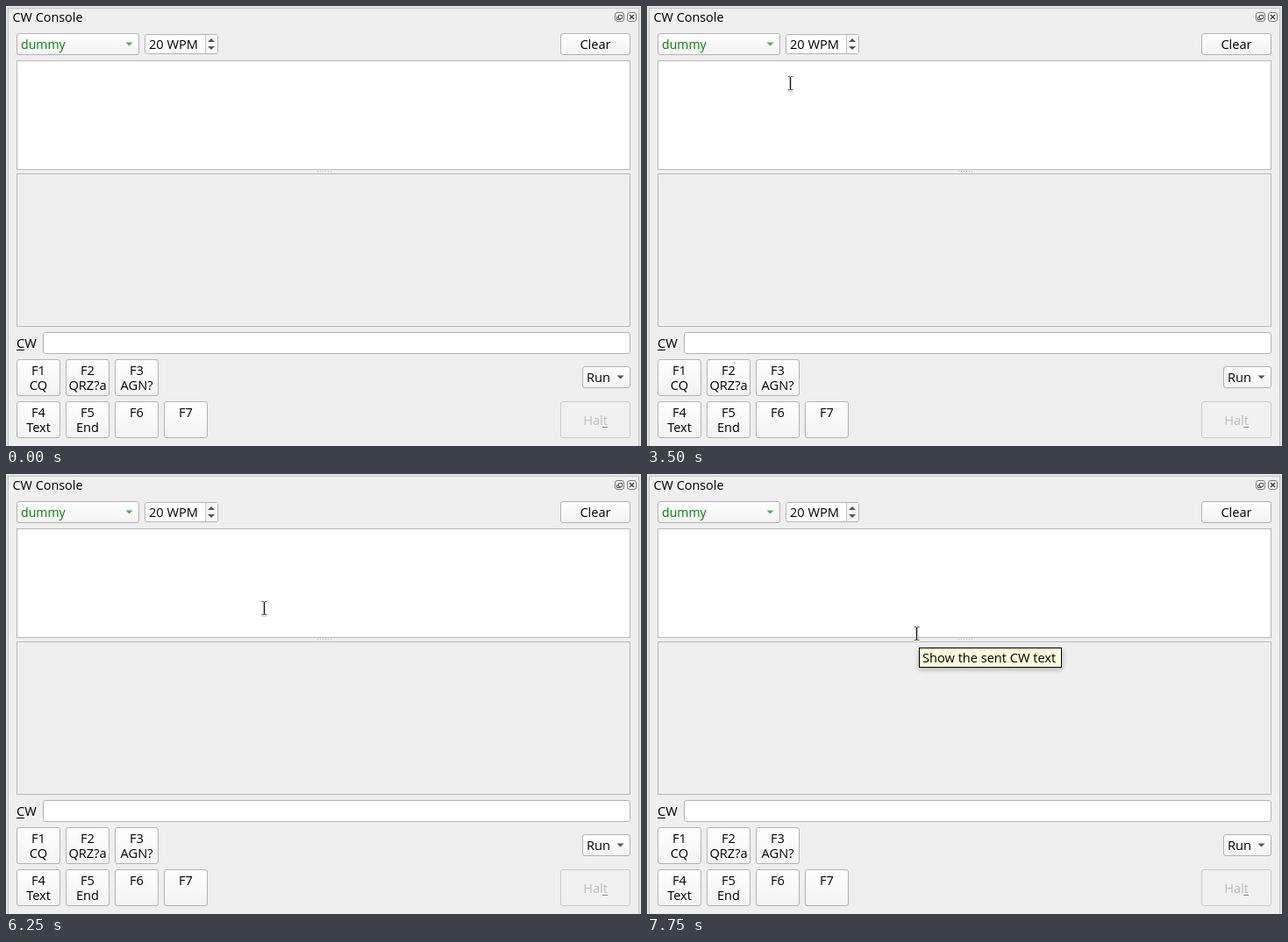
An HTML page for the animation above (8 s loop, 724 px wide and 502 px high).

```html
<!DOCTYPE html>
<html lang="en">
<head>
<meta charset="utf-8">
<title>CW Console</title>
<style>
html, body { margin: 0; width: 100%; height: 100%; overflow: hidden; background: #efefef; }
svg { display: block; width: 724px; height: 502px; }
text { font: 14.6px "Open Sans", "Noto Sans", sans-serif; fill: #000; white-space: pre; }
.mid { text-anchor: middle; }
</style>
</head>
<body>
<svg viewBox="0 0 724 502" xmlns="http://www.w3.org/2000/svg">
  <defs>
    <linearGradient id="face" x1="0" y1="0" x2="0" y2="1">
      <stop offset="0" stop-color="#fff"/>
      <stop offset="1" stop-color="#f3f3f3"/>
    </linearGradient>
    <filter id="soft" x="-10%" y="-60%" width="120%" height="220%">
      <feGaussianBlur stdDeviation="3"/>
    </filter>
  </defs>
  <rect width="724" height="502" fill="#e4e4e4"/>
  <rect x="2.5" y="2.5" width="719" height="520" fill="#efefef" stroke="#c3c3c3"/>
  <g id="ui"></g>
  <g id="tip">
    <rect x="0" y="2" width="163" height="23" fill="#000" opacity=".28" filter="url(#soft)"/>
    <rect id="paper" x=".5" y=".5" width="162" height="22" stroke="#000"/>
    <text x="4" y="17">Show the sent CW text</text>
  </g>
  <g id="beam" fill="none">
    <path d="M-3 -7.5H3.5M-3 7.5H3.5M.5 -7V8" stroke="#fff" stroke-width="3"/>
    <path d="M-2.5 9.5H3.5" stroke="#ccc"/>
    <path d="M-2.5 -7.5H0M1 -7.5H3.5M-2.5 7.5H0M1 7.5H3.5" stroke="#555"/>
    <path d="M.5 -7V7.5" stroke="#111" stroke-width="1.4"/>
  </g>
  <g id="arrow">
    <path d="M1.5 2V17L5 14L7.5 19.5L10 18.5L7.5 13H12Z" fill="#000" opacity=".18"/>
    <path d="M.5 .5V15.5L4 12.4L6.4 17.8L8.9 16.7L6.5 11.5H11.3Z" fill="#222" stroke="#fff"/>
  </g>
</svg>
<script>
const $ = id => document.getElementById(id);
const ui = $('ui');

function add(tag, attrs, label) {
  const el = document.createElementNS('http://www.w3.org/2000/svg', tag);
  for (const k in attrs) el.setAttribute(k, attrs[k]);
  if (label) el.textContent = label;
  ui.appendChild(el);
}
// Crisp 1px bordered box covering x..x2, y..y2
function box(x, y, x2, y2, fill, r = 2.5, stroke = '#b3b3b3') {
  add('rect', { x: x + .5, y: y + .5, width: x2 - x - 1, height: y2 - y - 1, rx: r, fill, stroke });
}
function label(str, x, y, mid, style = '') {
  add('text', { x, y, class: mid ? 'mid' : '', style }, str);
}
function tri(x, y, dir, fill) {
  add('path', { d: `M${x - 4} ${y - 2 * dir}h8l-4 ${4 * dir}z`, fill });
}
function line(x, y, w, fill) {
  add('rect', { x, y, width: w, height: 1, fill });
}
const FACE = 'url(#face)';

label('CW Console', 7.5, 18, false, 'font-size:14.4px');
box(694, 7, 705, 18, '#f4f4f4', 2.5, '#777');
box(708, 7, 719, 18, '#f4f4f4', 2.5, '#777');
add('path', { d: 'M698.5 10.5h4v4h-4zM698 12.5h-1.5v3h4v-1', fill: 'none', stroke: '#555' });
add('path', { d: 'M711 10l5 5m0 -5l-5 5', stroke: '#444', 'stroke-width': 1.5 });

box(12, 31, 152, 56, FACE);
label('dummy', 17, 49, false, 'fill:#008000;font-size:14.1px');
tri(140.5, 43.5, 1, '#4cae4c');
box(158, 32, 242, 55, '#fff');
add('path', { d: 'M228 33h13v21h-13z', fill: '#f6f6f6' });
add('path', { d: 'M227.5 33v21', stroke: '#c4c4c4' });
label('20 WPM', 163, 49);
tri(234, 39, -1, '#555');
tri(234, 48, 1, '#555');
box(632, 31, 712, 56, FACE);
label('Clear', 672, 49, true);

box(12, 62, 712, 187, '#fff', 0, '#b9b9b9');
box(12, 191, 712, 366, '#efefef', 0, '#b9b9b9');
for (let i = 0; i < 6; i++) line(355 + i * 3, 188, 1, '#b5b5b5');

label('CW', 12, 390);
line(12, 392, 9, '#000');
box(42, 372, 712, 397, '#fff');

[['F1', 'CQ'], ['F2', 'QRZ?a'], ['F3', 'AGN?'],
 ['F4', 'Text'], ['F5', 'End'], ['F6', ''], ['F7', '']].forEach(([key, name], i) => {
  const row = i < 3 ? 0 : 1;
  const x = 12 + 56 * (i - 3 * row), y = 403 + 48 * row;
  box(x, y, x + 50, y + 42, FACE);
  label(key, x + 25, y + 18, true);
  if (name) label(name, x + 25, y + 35, true);
});

box(657, 411, 712, 436, FACE);
label('Run', 662, 429);
tri(700.5, 423.5, 1, '#555');
box(632, 451, 712, 493, '#f1f1f1', 2.5, '#cbcbcb');
label('Halt', 672, 478, true, 'fill:#bebebe');
line(680, 480, 6, '#8a8a8a');

// time, pointer kind, x, y, tooltip index
const steps = [
  [0],
  [500, 'arrow', 20, 12],
  [630, 'arrow', 52, 27],
  [750, 'arrow', 91, 47],
  [880, 'beam', 124, 66],
  [1000, 'beam', 147, 77],
  [1130, 'beam', 155, 81],
  [3500, 'beam', 163, 88],
  [3630, 'beam', 167, 94],
  [4380, 'beam', 167, 94, 1],
  [5880, 'beam', 178, 102, 1],
  [6000, 'arrow', 214, 119, 1],
  [6130, 'beam', 264, 140],
  [6250, 'beam', 294, 153],
  [6380, 'beam', 301, 158],
  [6500, 'beam', 302, 165],
  [6630, 'beam', 303, 170, 2],
  [6750, 'arrow', 306, 176, 2],
  [6880, 'arrow', 308, 181, 2],
  [7000, 'arrow', 308, 181],
  [7630, 'beam', 307, 182],
  [7750, 'beam', 307, 182, 3]
];
const tips = [null, [170, 110, '#ffffdc'], [304, 173, '#ffffd8'], [310, 198, '#fffadc']];
const LOOP = 8000;

function place(id, on, x, y) {
  const el = $(id);
  el.style.display = on ? '' : 'none';
  if (on) el.setAttribute('transform', `translate(${x} ${y})`);
}
function draw(now) {
  const t = now % LOOP;
  const [, kind, x, y, tip] = steps.findLast(s => s[0] <= t);
  place('beam', kind === 'beam', x, y);
  place('arrow', kind === 'arrow', x, y);
  const [tx, ty, color] = tips[tip || 0] || [];
  place('tip', !!tip, tx, ty);
  if (tip) $('paper').setAttribute('fill', color);
}

const start = performance.now();
function tick() {
  draw(performance.now() - start);
  requestAnimationFrame(tick);
}
tick();
</script>
</body>
</html>
```
